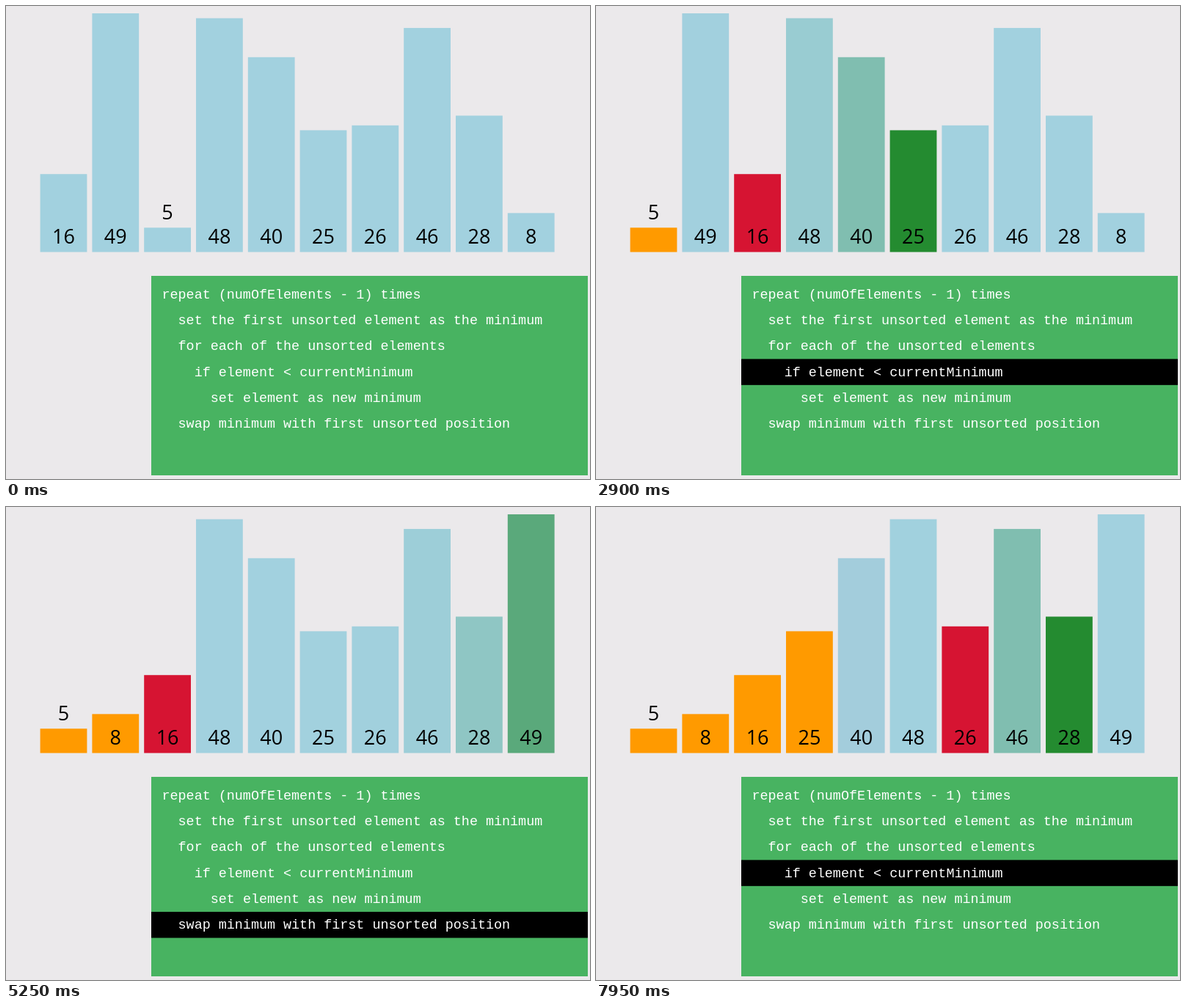
Recreate the animation shown at these times as an HTML page. Size 796 px wide and 645 px high, loop 8 s.

```html
<!DOCTYPE html>
<html lang="en">
<head>
<meta charset="utf-8">
<title>Selection sort</title>
<style>
  html, body { margin: 0; width: 100%; height: 100%; overflow: hidden; background: #ebe9eb; }
  svg { display: block; width: 796px; height: 645px; }
  .value { font: 27px "Open Sans", "Noto Sans", sans-serif; text-anchor: middle; }
  .code { font: 18.4px "Liberation Mono", "Courier New", monospace; fill: #fff; white-space: pre; }
</style>
</head>
<body>
<svg viewBox="0 0 796 645">
  <g id="bars"></g>
  <rect x="198" y="368" width="595" height="272" fill="#48b361"/>
  <rect id="marker" x="198" width="595" height="35.5"/>
  <g id="code"></g>
</svg>
<script>
const LOOP = 8000;
const VALUES = [16, 49, 5, 48, 40, 25, 26, 46, 28, 8];
const CODE = [
  'repeat (numOfElements - 1) times',
  '  set the first unsorted element as the minimum',
  '  for each of the unsorted elements',
  '    if element < currentMinimum',
  '      set element as new minimum',
  '  swap minimum with first unsorted position'
];
const BLUE = [162, 209, 223], GREEN = [36, 139, 48], RED = [214, 20, 50], ORANGE = [255, 154, 0];

const LEFT = 46.6, PITCH = 70.8, WIDTH = 63.8, BASE = 335.5, UNIT = 6.643;
const CODE_TOP = 375.3, CODE_PITCH = 35.35;

const FADE = 100;       // ms a colour or position change takes
const FADE_OUT = 0.73;  // share of a highlight lost per step
const SLIDE = 0.83;     // share of the way covered per step

// [step number, start time]; steps in between are evenly spaced
const BEATS = [[1, 10], [12, 1693], [29, 4317], [35, 5198], [52, 7807]];

function startOf(step) {
  let i = 1;
  while (i < BEATS.length - 1 && step > BEATS[i][0]) i++;
  const [s0, t0] = BEATS[i - 1], [s1, t1] = BEATS[i];
  return t0 + (step - s0) * (t1 - t0) / (s1 - s0);
}

function selectionSteps() {
  const order = VALUES.map((_, i) => i);
  const sorted = new Set();
  const steps = [];
  const push = (line, reds = [], green = -1) => steps.push({
    line,
    place: VALUES.map((_, id) => order.indexOf(id)),
    color: VALUES.map((_, id) =>
      reds.includes(id) ? RED : id === green ? GREEN : sorted.has(id) ? ORANGE : BLUE)
  });

  push(0);
  for (let i = 0; i < order.length - 1; i++) {
    let min = i;
    push(2, [order[min]]);
    for (let j = i + 1; j < order.length; j++) {
      push(4, [order[min]], order[j]);
      if (VALUES[order[j]] < VALUES[order[min]]) {
        min = j;
        push(5, [order[min]]);
      }
    }
    push(6, [order[i], order[min]]);
    sorted.add(order[min]);
    if (min !== i) {
      [order[i], order[min]] = [order[min], order[i]];
      push(6);
    }
  }
  return steps;
}

function add(parent, tag, attributes, text = '') {
  const node = document.createElementNS('http://www.w3.org/2000/svg', tag);
  for (const name in attributes) node.setAttribute(name, attributes[name]);
  node.textContent = text;
  return parent.appendChild(node);
}

const steps = selectionSteps();
const marker = document.getElementById('marker');

const bars = VALUES.map(value => {
  const group = add(document.getElementById('bars'), 'g', {});
  const height = value * UNIT;
  const rect = add(group, 'rect', { y: BASE - height, width: WIDTH, height });
  add(group, 'text', { class: 'value', x: WIDTH / 2, y: value < 8 ? 290.5 : 323.7 }, value);
  return { group, rect };
});

CODE.forEach((line, i) => {
  const indent = line.search(/\S/);
  add(document.getElementById('code'), 'text',
    { class: 'code', x: 212.5 + indent * 11.04, y: 398.5 + i * CODE_PITCH }, line.trim());
});

const mix = (a, b, p) => a + (b - a) * p;
const ease = p => p < 0.5 ? 4 * p ** 3 : 1 - 4 * (1 - p) ** 3;

function draw(time) {
  let now = 0;
  while (now + 1 < steps.length && startOf(now + 1) <= time) now++;

  const partial = now ? ease(Math.min(1, (time - startOf(now)) / FADE)) : 1;

  bars.forEach(({ group, rect }, id) => {
    let place = id, color = BLUE;
    for (let k = 0; k <= now; k++) {
      const progress = k < now ? 1 : partial;
      const goal = steps[k].color[id];
      const share = goal === BLUE ? progress * FADE_OUT : progress;
      color = color.map((c, i) => mix(c, goal[i], share));
      place = mix(place, steps[k].place[id], progress * SLIDE);
    }
    group.setAttribute('transform', `translate(${LEFT + place * PITCH} 0)`);
    rect.setAttribute('fill', `rgb(${color.map(Math.round)})`);
  });

  const line = steps[now].line;
  marker.setAttribute('visibility', line ? 'visible' : 'hidden');
  marker.setAttribute('y', CODE_TOP + (line - 1) * CODE_PITCH);
}

const began = performance.now();
function tick() {
  draw((performance.now() - began) % LOOP);
  requestAnimationFrame(tick);
}
tick();
</script>
</body>
</html>
```
